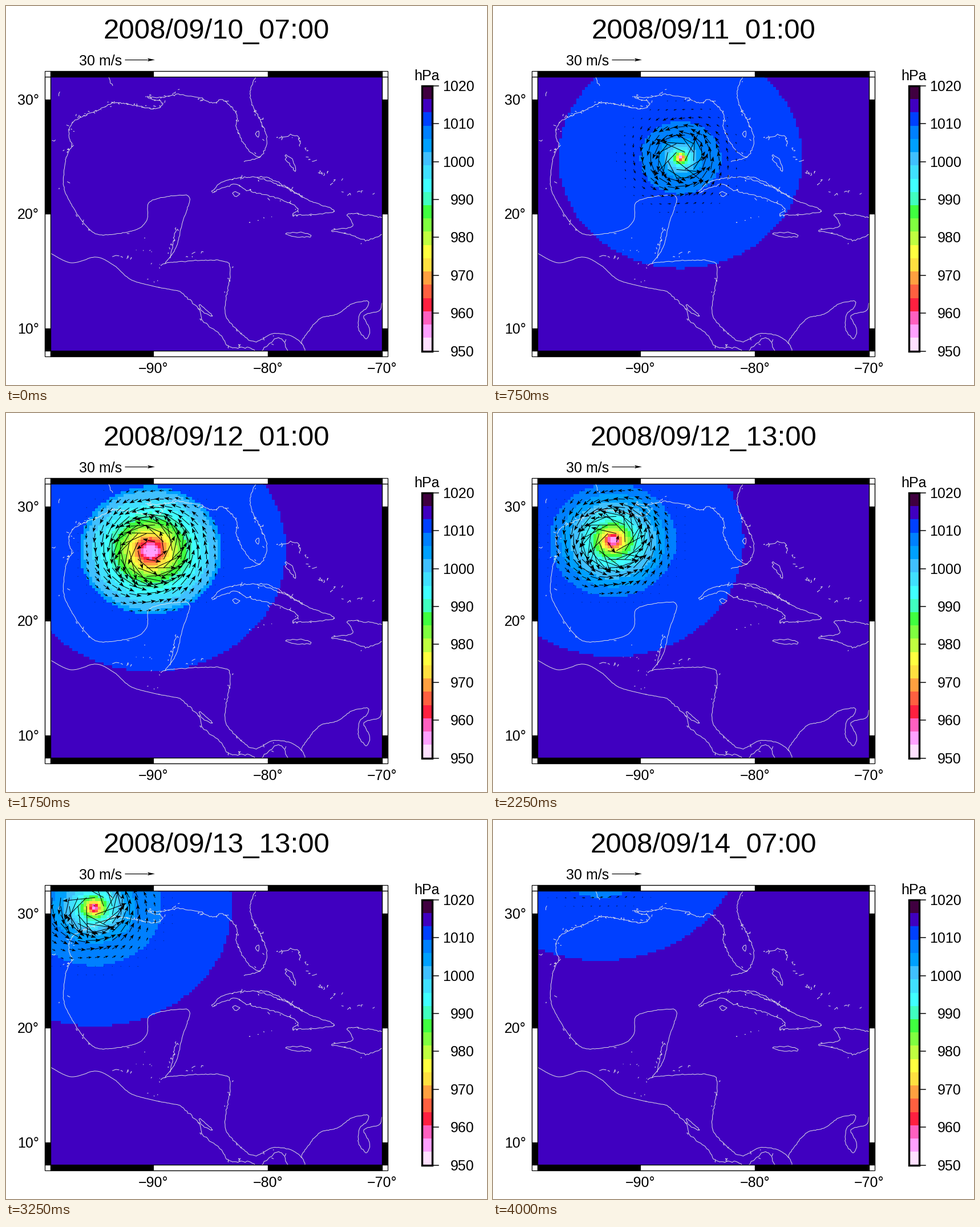
Recreate the animation shown at these times as a matplotlib script. Size 843x664 px, loop 4250 ms.

```python
import numpy as np
import matplotlib.pyplot as plt
from matplotlib.animation import FuncAnimation
from matplotlib.collections import LineCollection, PolyCollection
from matplotlib.colors import BoundaryNorm, ListedColormap
from matplotlib.patches import Rectangle

plt.rcParams["font.family"] = "Liberation Sans"
W, H, DPI = 843, 664, 100
PX = 72 / DPI
DEG = 20.04
LEFT, RIGHT, TOP, BOTTOM = 78, 659, 124, 604
FRAMES = 17
P_ENV, P_EYE = 1015, 955
rng = np.random.default_rng(8)

COLORS = [
    "#ffe0ff", "#ffa0ff", "#ff60c0", "#ff2040", "#ff6040", "#ffa040", "#ffe040",
    "#ffff40", "#c0ff40", "#80ff40", "#40ff40", "#40ffc0", "#40ffff", "#40e0ff",
    "#40c0ff", "#00a0ff", "#0080ff", "#0040ff", "#4000c0", "#400040",
]

# storm path: a quartic through five positions, one step every 6 hours
PATH_T = [1, 5, 9, 13, 16]
PATH_X = np.polyfit(PATH_T, [351, 295, 210, 154, 188], 4)
PATH_Y = np.polyfit(PATH_T, [284, 253, 223, 153, 50], 4)
# storm size at key steps
KEYS = [1, 3, 4, 5, 7, 9, 13, 16]
OUTER = [193, 194, 181, 199, 213, 204, 208, 196]
CORE = [54, 64, 76, 88, 112, 99, 102, 85]
SCALE = [5.2, 6.3, 7.4, 8.6, 34, 18, 11.6, 8.3]

fig = plt.figure(figsize=(W / DPI, H / DPI), dpi=DPI, facecolor="white")
ax = fig.add_axes([0, 0, 1, 1])
ax.axis("off")

GX, GY = np.meshgrid(LEFT + DEG / 4 * np.arange(117), TOP + DEG / 4 * np.arange(97))
NX, NY = np.meshgrid(np.arange(81, RIGHT, 0.75 * DEG),
                     np.arange(136, BOTTOM, 0.75 * DEG))


def size(k):
    return [np.interp(k, KEYS, v) for v in (OUTER, CORE, SCALE)]


def polar(x, y, k):
    """True distance (in pixels of latitude) and angle from the eye."""
    cx, cy = np.polyval(PATH_X, k), np.polyval(PATH_Y, k)
    lat = np.radians(32 - (cy - TOP) / DEG)
    dx, dy = (x - cx) * np.cos(lat), y - cy
    return np.maximum(np.hypot(dx, dy), 0.3), np.arctan2(dy, dx), lat


def pressure(k):
    if k == 0:
        return np.full(GX.shape, 1014.5)
    outer, core, scale = size(k)
    r = polar(GX, GY, k)[0]
    inner = P_EYE + (P_ENV - P_EYE) * np.exp(-scale / r) + 5 * (r / core) ** 3
    p = np.where(r < outer, 1011, 1014.5)
    return np.where(r < core, np.minimum(inner, 1009.4), p)


def wind(k):
    """Tail points and vectors of the wind arrows: gradient wind, 1.73 px per m/s."""
    _, core, scale = size(k)
    r, angle, lat = polar(NX, NY, k)
    q = scale / r
    grad = (P_ENV - P_EYE) * 100 / 1.15 * q * np.exp(-q)
    cor = 1.458e-4 * np.sin(lat) * r * 5550 / 2
    speed = np.sqrt(grad + cor ** 2) - cor
    fade = np.clip((130 - r) / 95, 0, 0.85) * (1 - np.exp(-(r / (0.6 * scale)) ** 2))
    if core > 95:
        fade[r > core] *= 0.25
    fade *= np.exp(-np.maximum(r - core, 0) / 60)
    n = 1.73 * speed * fade
    turn = angle - np.pi / 2 - np.radians(12)
    keep = (r < core * 0.5 + 72) & (k > 0)
    return NX[keep], NY[keep], (n * np.cos(turn))[keep], (n * np.sin(turn))[keep]


def arrows(x, y, u, v, head=9, ratio=0.7):
    tail, vec = np.column_stack([x, y]), np.column_stack([u, v])
    n = np.hypot(u, v)[:, None] + 1e-6
    d = vec / n
    h = np.minimum(head, 0.55 * n + 0.6)
    half = np.column_stack([-d[:, 1], d[:, 0]]) * h * ratio / 2
    tip = tail + vec
    base = tip - d * h
    return (np.stack([tail, base], axis=1),
            np.stack([tip, base + half, base + d * h * 0.15, base - half], axis=1))


shore = []


def islets(centres, spread, length=1.5):
    for c in centres:
        walk = rng.normal(0, length, (3, 2)).cumsum(0)
        shore.append(c + rng.normal(0, spread, 2) + walk)


def coast(points, rough=0.5, bits=0):
    """Smooth curve through a few points, roughened, with islets along it."""
    p = np.array(points, float)
    ends = [p[-2], p[1]] if (p[0] == p[-1]).all() else [p[0], p[-1]]
    q = np.vstack([ends[:1], p, ends[1:]])
    out = []
    for a, b, c, d in zip(q, q[1:], q[2:], q[3:]):
        n = max(2, int(np.hypot(*(c - b)) / 3))
        t = np.arange(n)[:, None] / n
        curve = b + 0.5 * t * (c - a + t * (2 * a - 5 * b + 4 * c - d
                                            + t * (3 * b - 3 * c + d - a)))
        curve[1:] += rng.normal(0, rough, (n - 1, 2))
        out.append(curve)
    line_ = np.vstack(out + [p[-1:]])
    shore.append(line_)
    islets(rng.permutation(line_)[:bits], 2.5)


def chain(start, end, n, spread=4, length=2.5):
    """Row of small islands between two points."""
    islets(np.linspace(start, end, n), spread, length)


# mainland
coast([(440, 124), (429, 143), (431, 170), (448, 205), (457, 235), (449, 260), (438, 263),
       (420, 246), (404, 213), (404, 189), (380, 164), (362, 170), (340, 161), (300, 154)],
      0.7, 22)
coast([(300, 154), (272, 160), (248, 159), (275, 170), (262, 180), (231, 175), (193, 169),
       (165, 181), (125, 199), (110, 220), (115, 243), (105, 265)], 0.9, 50)
coast([(105, 265), (101, 315), (118, 353), (144, 389), (168, 401), (225, 393), (247, 375),
       (252, 343), (300, 332), (322, 337), (309, 380), (298, 423), (278, 452)], 0.3, 6)
coast([(298, 388), (292, 420), (288, 442)], 1, 5)
coast([(271, 455), (290, 449), (375, 446), (393, 463), (384, 535), (405, 567), (436, 588),
       (468, 574), (500, 578), (519, 592), (524, 604)], 0.4, 8)
coast([(519, 592), (521, 582), (550, 548), (580, 540), (606, 522), (634, 517), (632, 529),
       (620, 540), (618, 565), (632, 583), (637, 565), (627, 543), (654, 534), (659, 520)], 0.4)
coast([(78, 433), (115, 450), (158, 440), (190, 455), (225, 482), (305, 500)], 0.15)
coast([(305, 500), (340, 534), (345, 552), (378, 578), (392, 597), (425, 598), (436, 604)],
      0.8, 6)
coast([(448, 604), (478, 581), (494, 604)], 0.7, 3)
coast([(179, 124), (187, 140)], 0.8)
# lakes
coast([(340, 523), (362, 543), (345, 535), (340, 523)])
coast([(437, 224), (443, 219), (442, 230), (437, 224)], 0.3)
# islands
coast([(361, 325), (385, 306), (450, 300), (490, 316), (530, 340), (575, 358), (550, 364),
       (503, 366), (512, 355), (480, 338), (420, 322), (400, 312), (361, 327)], 0.7, 18)
coast([(440, 300), (488, 317), (520, 335)], 1.1, 5)
coast([(397, 328), (402, 325), (410, 329), (404, 334), (397, 328)])
coast([(491, 398), (520, 397), (534, 404), (505, 404), (491, 398)])
coast([(659, 370), (600, 364), (608, 385), (571, 393), (600, 400), (633, 410), (659, 400)],
      0.7, 4)
coast([(417, 273), (446, 264)], 0.8)
coast([(489, 262), (502, 268), (507, 290), (489, 262)], 0.9)
coast([(478, 232), (510, 227), (515, 246)], 1.2, 6)
chain((522, 251), (556, 297), 9)
chain((560, 300), (636, 337), 9)
chain((198, 437), (216, 447), 4, 1, 3)
chain((235, 412), (270, 490), 12, 10, 0.7)
chain((315, 440), (340, 435), 4, 2)
chain((428, 378), (465, 370), 4, 1, 1.2)
chain((90, 148), (97, 321), 3, 2)

FRAME_Z = 5
image = ax.imshow(pressure(0), cmap=ListedColormap(COLORS), aspect="auto", zorder=1,
                  norm=BoundaryNorm(np.linspace(950, 1020, 21), 20),
                  interpolation="nearest",
                  extent=(LEFT - DEG / 8, LEFT + DEG * 29.125,
                          TOP + DEG * 24.125, TOP - DEG / 8))
lines = LineCollection(shore, colors="#e6e6e6", linewidths=0.95 * PX, zorder=2)
shafts = LineCollection([], colors="black", linewidths=PX, zorder=3)
heads = PolyCollection([], facecolors="black", edgecolors="none", zorder=3)
clip = Rectangle((LEFT, TOP), RIGHT - LEFT, BOTTOM - TOP + 1, transform=ax.transData)
for layer in (lines, shafts, heads):
    ax.add_collection(layer)
for layer in (image, lines, shafts, heads):
    layer.set_clip_path(clip)
ax.set(xlim=(0, W), ylim=(H, 0))


def box(x0, y0, x1, y1, fill="none", lw=1.2, edge="black"):
    ax.add_patch(Rectangle((x0, y0), x1 - x0, y1 - y0, fc=fill, ec=edge,
                           lw=lw * PX, joinstyle="miter", zorder=FRAME_Z))


def line(x0, y0, x1, y1, lw=1.2):
    ax.plot([x0, x1], [y0, y1], color="black", lw=lw * PX, zorder=FRAME_Z + 1)


def label(x, y, s, ha="center", pt=18):
    return ax.text(x, y, s, ha=ha, va="baseline", fontsize=pt, zorder=FRAME_Z + 2)


# checkered map frame
EDGE = 10
x_cuts = [LEFT, 258, 459, RIGHT]
y_cuts = [TOP, 164, 364, 565, BOTTOM]
for i, (a, b) in enumerate(zip(x_cuts, x_cuts[1:])):
    for y in (TOP - EDGE, BOTTOM):
        box(a, y, b, y + EDGE, ("black", "white")[i % 2])
for i, (a, b) in enumerate(zip(y_cuts, y_cuts[1:])):
    for x in (LEFT - EDGE, RIGHT):
        box(x, a, x + EDGE, b, ("white", "black")[i % 2])
box(LEFT - EDGE, TOP - EDGE, RIGHT + EDGE, BOTTOM + EDGE)
for y in (TOP, BOTTOM):
    line(LEFT - EDGE, y, RIGHT + EDGE, y)
for x in (LEFT, RIGHT):
    line(x, TOP - EDGE, x, BOTTOM + EDGE)

for i in range(3):
    label(x_cuts[i + 1], 643, f"−{90 - 10 * i}°")
    label(58, y_cuts[i + 1] + 9, f"{30 - 10 * i}°", "right")

# colour scale
BAR_TOP, BAR_BOTTOM = 140, 604.5
step = (BAR_BOTTOM - BAR_TOP) / len(COLORS)
for i, c in enumerate(COLORS):
    y = BAR_BOTTOM - i * step
    box(729, y - step, 746, y, c, 0, "none")
box(729, BAR_TOP, 746.5, BAR_BOTTOM, lw=3.4)
for i, y in enumerate(np.linspace(BAR_TOP, BAR_BOTTOM, 8)):
    line(747, y, 757.5, y, 1.5)
    label(821, y + 9, str(1020 - 10 * i), "right")
label(737.5, 130, "hPa")

# speed key
label(128, 103.5, "30 m/s", "left")
key_shaft, key_head = arrows([208], [94.3], [53], [0], 13, 0.42)
ax.add_collection(LineCollection(key_shaft, colors="black", linewidths=1.2 * PX))
ax.add_collection(PolyCollection(key_head, facecolors="black", edgecolors="none"))

title = label(368.5, 57, "", pt=35.5)


def update(k):
    hours = 7 + 6 * k
    title.set_text(f"2008/09/{10 + hours // 24}_{hours % 24:02d}:00")
    image.set_data(pressure(k))
    shaft, head = arrows(*wind(k))
    shafts.set_segments(shaft)
    heads.set_verts(head)
    return image, shafts, heads, title


anim = FuncAnimation(fig, update, frames=FRAMES, interval=250,
                     repeat=True, repeat_delay=0, blit=False)
plt.show()
```
